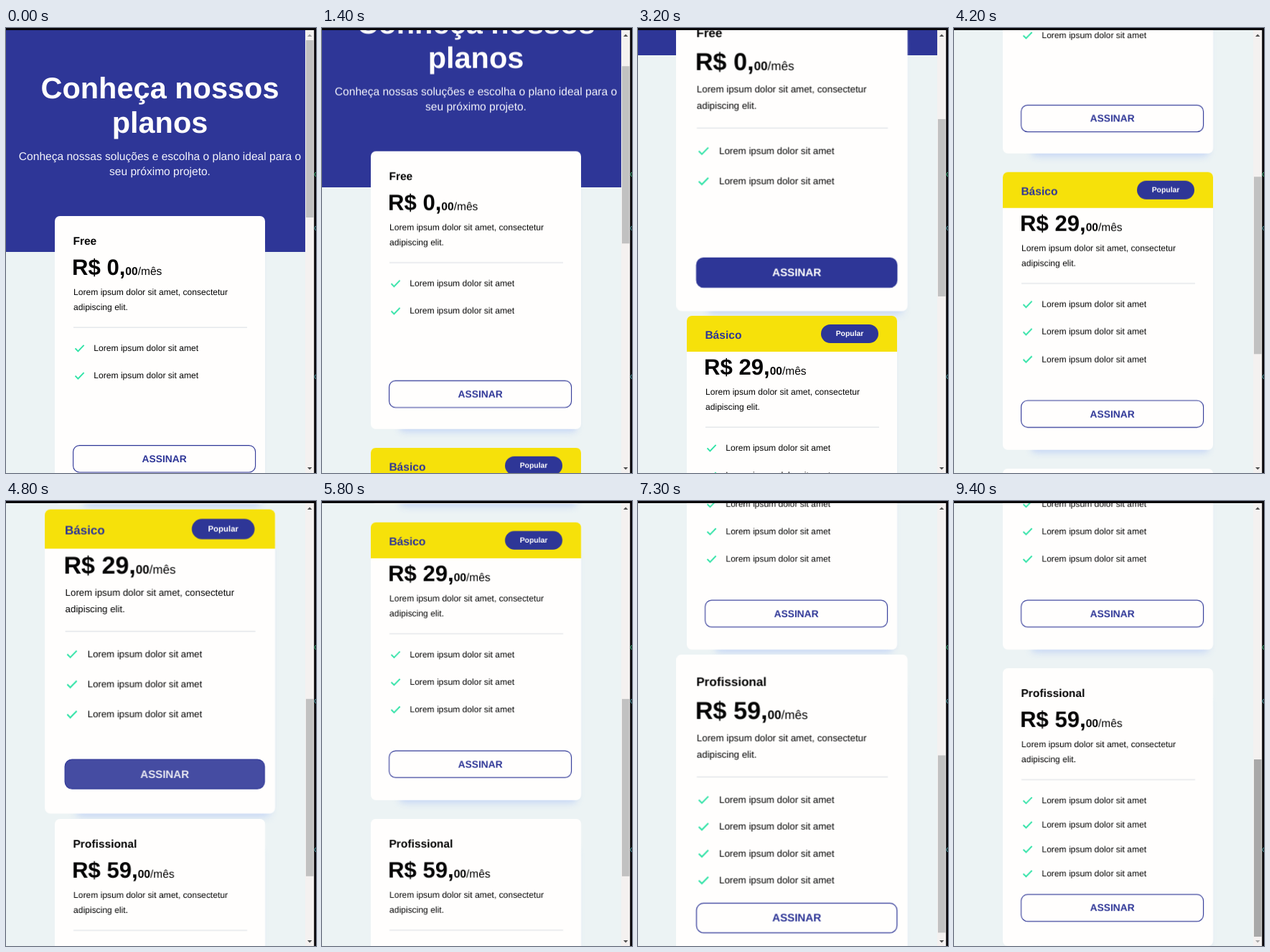
An HTML page for the animation above (9.8 s loop, 432x620 px).

```html
<!DOCTYPE html>
<html lang="pt-BR">
<head>
<meta charset="utf-8">
<title>Planos</title>
<style>
  html, body { margin: 0; width: 100%; height: 100%; overflow: hidden; background: #000; }
  svg { display: block; width: 432px; height: 620px; }
  text { font-family: "Liberation Sans", Arial, sans-serif; text-rendering: geometricPrecision; white-space: pre; }
  .bold { font-weight: 700; }
  .mid { text-anchor: middle; }
</style>
</head>
<body>
<svg id="stage" viewBox="0 0 432 620">
  <defs>
    <filter id="soft" x="-20%" y="-20%" width="140%" height="140%"><feGaussianBlur stdDeviation="5"/></filter>
    <clipPath id="view"><rect y="3" width="417" height="617"/></clipPath>
  </defs>
</svg>
<script>
const LOOP = 9800;
const BLUE = '#2e3697', WHITE = '#fffefd', INK = '#050505';
const stage = document.getElementById('stage');

function add(parent, tag, attrs = {}, content) {
  const el = document.createElementNS('http://www.w3.org/2000/svg', tag);
  for (const key in attrs) el.setAttribute(key, attrs[key]);
  if (content) el.textContent = content;
  parent.append(el);
  return el;
}

const rect = (parent, x, y, width, height, fill, more) =>
  add(parent, 'rect', { x, y, width, height, fill, ...more });

const text = (parent, x, y, size, content, cls = '', fill = INK) =>
  add(parent, 'text', { x, y, 'font-size': size, class: cls, fill }, content);

// steps: [time, value, easing towards the next step]
function animate(el, prop, steps, format = v => v) {
  const all = [[0, steps[0][1]], ...steps, [LOOP, steps[steps.length - 1][1]]];
  el.animate(
    all.map(([time, value, easing = 'linear']) => ({ offset: time / LOOP, [prop]: format(value), easing })),
    { duration: LOOP, iterations: Infinity }
  );
}

// Goes from off to on during [a, b] and back during [c, d]
const pulse = ([a, b, c, d], off, on) =>
  [[a, off, 'ease'], [b, on], [c, on, 'ease'], [d, off]];

function drawCard(page, { name, price, top, items, gap, buttonY, popular, hover, press }) {
  const card = add(page, 'g');
  card.style.transformOrigin = `214.5px ${top + 193.5}px`;
  animate(card, 'transform', pulse(hover, 1, 1.1), s => `scale(${s})`);

  rect(card, 108, top + 40, 247, 351, '#bfd1f5', { rx: 6, filter: 'url(#soft)', opacity: 0.85 });
  rect(card, 68, top, 293, 387, WHITE, { rx: 7 });

  if (popular) {
    add(card, 'path', { d: `M68 ${top + 50}v-43a7 7 0 0 1 7-7h279a7 7 0 0 1 7 7v43z`, fill: '#f6e10a' });
    rect(card, 255, top + 12, 80, 26, BLUE, { rx: 13 });
    text(card, 295, top + 28.4, 10.4, 'Popular', 'bold mid', WHITE);
  }
  text(card, 93.4, top + (popular ? 31.6 : 40), 15.55, name, 'bold', popular ? BLUE : INK);

  const cost = text(card, 92, top + 81.6, 31.1, '', 'bold');
  add(cost, 'tspan', {}, `R$ ${price},`);
  add(cost, 'tspan', { 'font-size': 15.55 }, '00');
  add(cost, 'tspan', { 'font-size': 15.55, 'font-weight': 400 }, '/mês');

  text(card, 94, top + 109.9, 12.1, 'Lorem ipsum dolor sit amet, consectetur');
  text(card, 94, top + 130.9, 12.1, 'adipiscing elit.');
  rect(card, 94, top + 154.5, 242, 1.4, '#e4e7ea');

  for (let i = 0; i < items; i++) {
    const y = top + 183.8 + i * gap;
    add(card, 'path', {
      d: `M96.5 ${y + 0.6}l3.9 3.9 8.2-8.4`,
      fill: 'none', stroke: '#2fe3a6', 'stroke-width': 1.9
    });
    text(card, 122.3, y + 4.2, 12.1, 'Lorem ipsum dolor sit amet');
  }

  const y = top + buttonY;
  const button = rect(card, 93.6, y, 254, 37.4, WHITE, { rx: 9, stroke: BLUE, 'stroke-width': 1.1 });
  const label = text(card, 220.6, y + 23.4, 13.8, 'ASSINAR', 'bold mid', BLUE);
  animate(button, 'fill', pulse(press, WHITE, BLUE));
  animate(label, 'fill', pulse(press, BLUE, WHITE));
}

// Page
const view = add(stage, 'g', { 'clip-path': 'url(#view)' });
rect(view, 0, 0, 417, 620, '#ecf3f4');
const page = add(view, 'g');
rect(page, 0, 0, 417, 312, BLUE);
text(page, 214.5, 98.4, 41.5, 'Conheça nossos', 'bold mid', WHITE);
text(page, 214.5, 146.2, 41.5, 'planos', 'bold mid', WHITE);
text(page, 214.5, 184.4, 15.55, 'Conheça nossas soluções e escolha o plano ideal para o', 'mid', '#f3f4fb');
text(page, 214.5, 205.4, 15.55, 'seu próximo projeto.', 'mid', '#f3f4fb');

[
  { name: 'Free', price: 0, top: 262, items: 2, gap: 38.3, buttonY: 319.6,
    hover: [2250, 2700, 3250, 3550], press: [2800, 3150, 3220, 3450] },
  { name: 'Básico', price: 29, top: 675, items: 3, gap: 38.3, buttonY: 318.2, popular: true,
    hover: [4550, 4900, 5150, 5500], press: [4650, 4900, 5150, 5400] },
  { name: 'Profissional', price: 59, top: 1088, items: 4, gap: 34, buttonY: 315.2,
    hover: [6780, 7200, 8150, 8600], press: [7400, 7700, 7850, 8150] }
].forEach(plan => drawCard(page, plan));

// Scrollbar
rect(stage, 417, 3, 12.5, 617, '#f4f1f0');
const thumb = rect(stage, 418, 17, 10.5, 247, '#c1c1c1');
const up = add(stage, 'path', { d: 'M420 12l3.2-3.4 3.2 3.4z', fill: '#505050' });
const down = add(stage, 'path', { d: 'M420 612l3.2 3.4 3.2-3.4z', fill: '#505050' });

const scroll = [
  [1100, 0], [1400, 90], [2000, 274], [3400, 274], [4200, 474],
  [4300, 500], [4700, 645], [5800, 645]
];
animate(page, 'transform', [...scroll, [6650, 855]], y => `translateY(${-y}px)`);
animate(thumb, 'transform', [...scroll, [6650, 841], [7700, 841], [7750, 855]],
  y => `translateY(${y * 0.4012}px)`);
animate(thumb, 'fill', [[8500, '#c1c1c1'], [8560, '#a8a8a8']]);
animate(up, 'fill', [[1100, '#a0a0a0'], [1150, '#505050']]);
animate(down, 'fill', [[7700, '#505050'], [7750, '#a8a8a8']]);

// Dark window behind
rect(stage, 0, 0, 432, 3, '#08060a');
rect(stage, 429.5, 0, 2.5, 620, '#08060a');
[[201, '#3fd08a'], [276, '#4fb0b8'], [483, '#4fb0b8']].forEach(([y, stroke]) =>
  add(stage, 'path', { d: `M432 ${y}q-4 2.5 0 6`, fill: 'none', stroke, 'stroke-width': 1 }));
</script>
</body>
</html>
```
